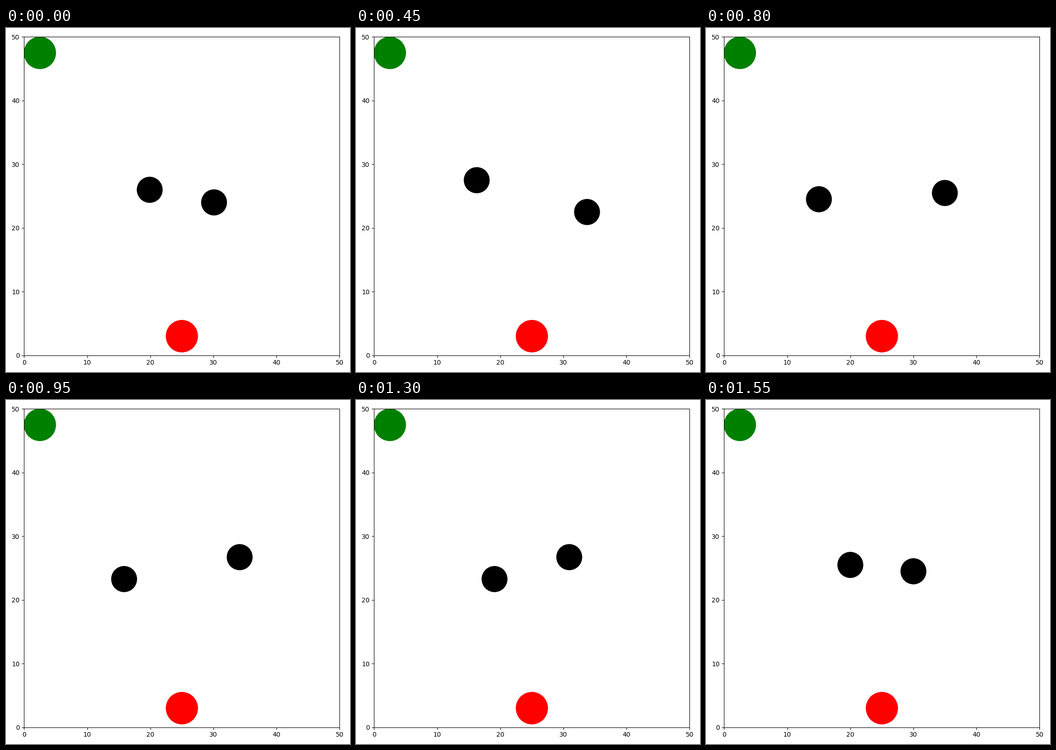
Write a matplotlib script that moves like this. It is 748 by 748 pixels and loops after 1600 ms.

```python
import numpy as np
import matplotlib.pyplot as plt
from matplotlib.animation import FuncAnimation
from matplotlib.patches import Circle

FRAMES = 32
SIZE = 50
SPEED = 0.5
START = np.array([20.0, 25.0])
STAGE = 748
LEFT, RIGHT, TOP, BOTTOM = 39.45, 725.45, 19.45, 711.6  # plot area, pixels

# Each ball moves at constant speed while its heading turns one full circle.
heading = 2 * np.pi * np.arange(FRAMES) / FRAMES
steps = SPEED * np.column_stack([-np.sin(heading), np.cos(heading)])
path = START + np.cumsum(steps, axis=0)

fig, ax = plt.subplots(figsize=(STAGE / 100, STAGE / 100), dpi=100)
fig.subplots_adjust(left=LEFT / STAGE, right=RIGHT / STAGE,
                    bottom=1 - BOTTOM / STAGE, top=1 - TOP / STAGE)
ax.set_xlim(0, SIZE)
ax.set_ylim(0, SIZE)


def add_ball(center, radius, color):
    return ax.add_patch(Circle(center, radius, color=color))


add_ball((25, 3), 2.5, "red")
add_ball((2.5, 47.5), 2.5, "green")
left = add_ball(START, 2, "black")
right = add_ball(SIZE - START, 2, "black")


def update(i):
    pos = path[(i + 1) % FRAMES]
    left.center = tuple(pos)
    right.center = tuple(SIZE - pos)
    return left, right


anim = FuncAnimation(fig, update, frames=FRAMES, interval=50,
                     repeat=True, repeat_delay=0)
plt.show()
```
